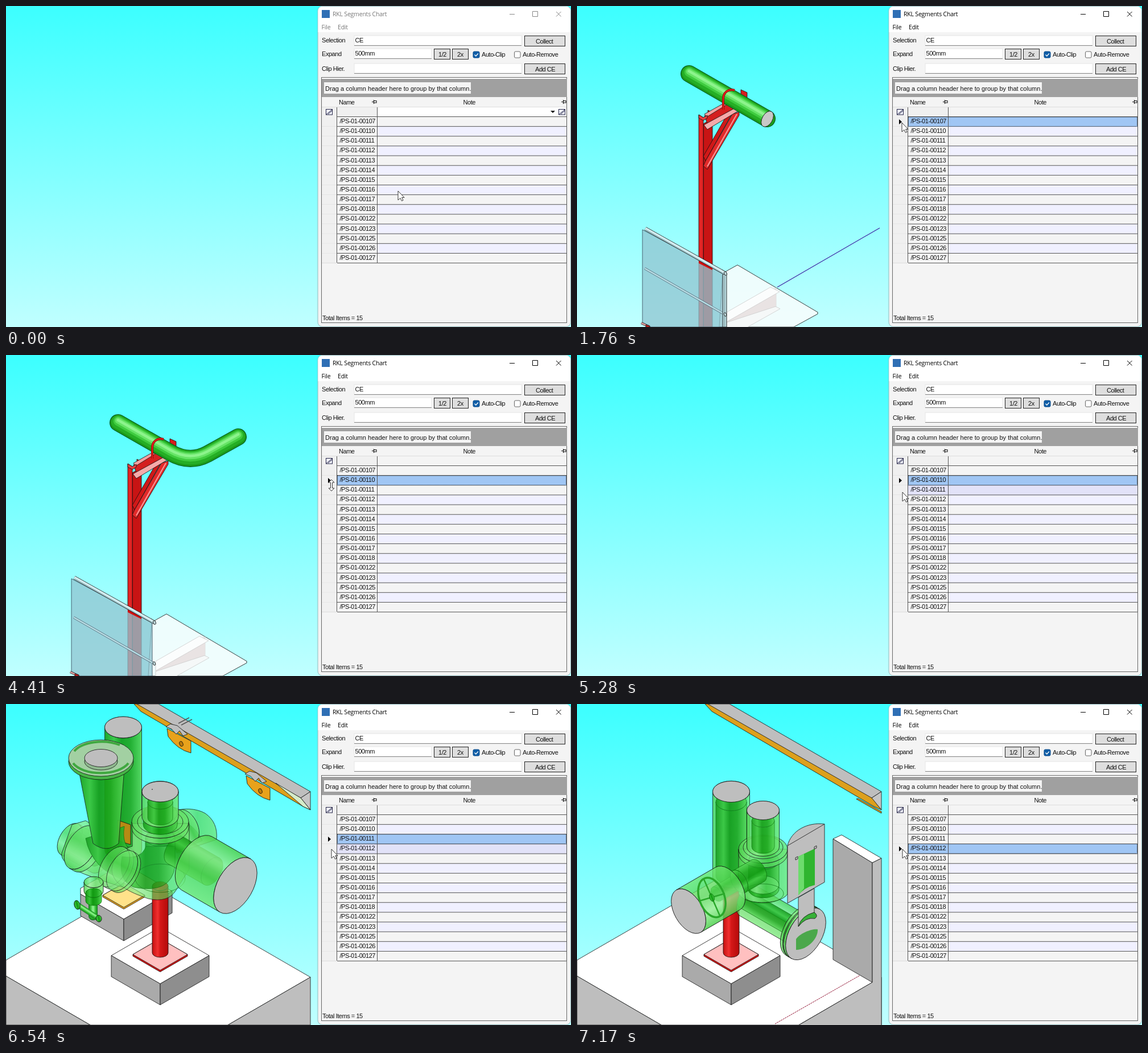
An HTML page that plays this animation: 993x564 px, repeating every 8000 ms.

```html
<!DOCTYPE html>
<html lang="en">
<head>
<meta charset="utf-8">
<title>Segments chart</title>
<style>
html, body { margin: 0; width: 100%; height: 100%; overflow: hidden; background: #7fffff; }
svg { display: block; width: 993px; height: 564px; }
text { font: 11px "Liberation Sans", Arial, sans-serif; letter-spacing: -.45px; fill: #111; white-space: pre; }
text.wide { letter-spacing: .03px; }
text.ui { font: 10.5px "Open Sans", "Noto Sans", sans-serif; letter-spacing: -.2px; fill: inherit; }
.anim { animation: 8s step-end infinite; }

#chrome { animation-name: focus; }
@keyframes focus { 0% { fill: #777; stroke: #888; } 15.875%, 100% { fill: #000; stroke: #000; } }

#filter { animation-name: filter; }
@keyframes filter { 0% { visibility: visible; } 22%, 100% { visibility: hidden; } }

#arrow { animation-name: arrow; }
@keyframes arrow {
  0% { transform: translate(689px, 325px); }
  1.625% { transform: translate(683px, 316px); }
  3.25% { transform: translate(657px, 284px); }
  4.75% { transform: translate(620px, 243px); }
  6.375% { transform: translate(592px, 218px); }
  7.875% { transform: translate(576px, 208px); }
  9.375% { transform: translate(571px, 205px); }
  34.5% { transform: translate(571px, 215px); }
  36.25% { transform: translate(571px, 221px); }
  55.125% { transform: translate(-50px, 0); }
  56.75% { transform: translate(572px, 234px); }
  58.25% { transform: translate(572px, 241px); }
  78.625% { transform: translate(-50px, 0); }
  80.125% { transform: translate(572px, 251px); }
  81.75%, 100% { transform: translate(572px, 255px); }
}
#resize { animation-name: resize; }
@keyframes resize {
  0% { transform: translate(-50px, 0); }
  55.125% { transform: translate(572px, 229px); }
  56.75% { transform: translate(-50px, 0); }
  78.625% { transform: translate(572px, 246px); }
  80.125%, 100% { transform: translate(-50px, 0); }
}
#selected { animation-name: selected; }
@keyframes selected {
  0% { transform: translateY(-900px); }
  22% { transform: translateY(0); }
  45.625% { transform: translateY(17px); }
  67.625% { transform: translateY(34px); }
  89.625%, 100% { transform: translateY(51px); }
}
#hover { animation-name: hover; }
@keyframes hover {
  0% { transform: translateY(-900px); }
  34.5% { transform: translateY(17px); }
  45.625% { transform: translateY(-900px); }
  56.75% { transform: translateY(34px); }
  67.625% { transform: translateY(-900px); }
  80.125% { transform: translateY(51px); }
  89.625%, 100% { transform: translateY(-900px); }
}
#rack { animation-name: rack; }
@keyframes rack { 0% { visibility: hidden; } 20.375% { visibility: visible; } 42.625%, 100% { visibility: hidden; } }
#bend { animation-name: bend; }
@keyframes bend { 0% { visibility: hidden; } 42.625% { visibility: visible; } 64.5%, 100% { visibility: hidden; } }
#pump { animation-name: pump; }
@keyframes pump { 0% { visibility: hidden; } 67.625% { visibility: visible; } 88%, 100% { visibility: hidden; } }
#valve { animation-name: valve; }
@keyframes valve { 0% { visibility: hidden; } 89.625%, 100% { visibility: visible; } }
</style>
</head>
<body>
<svg viewBox="0 0 993 564" xmlns="http://www.w3.org/2000/svg">
  <defs>
    <linearGradient id="sky" x2="0" y2="1"><stop stop-color="#3cffff"/><stop offset="1" stop-color="#c0ffff"/></linearGradient>
    <linearGradient id="dark"><stop stop-color="#179a17"/><stop offset=".25" stop-color="#38c438"/><stop offset=".45" stop-color="#129a12"/><stop offset=".7" stop-color="#1fa81f"/><stop offset="1" stop-color="#55d655"/></linearGradient>
    <linearGradient id="light"><stop stop-color="#4cd04c" stop-opacity=".85"/><stop offset=".3" stop-color="#8eee8e" stop-opacity=".8"/><stop offset=".6" stop-color="#50d450" stop-opacity=".75"/><stop offset="1" stop-color="#70e670" stop-opacity=".8"/></linearGradient>
    <linearGradient id="red"><stop stop-color="#c41010"/><stop offset=".35" stop-color="#f03030"/><stop offset=".5" stop-color="#d41818"/><stop offset="1" stop-color="#b40a0a"/></linearGradient>
  </defs>
  <rect width="993" height="564" fill="url(#sky)"/>
  <g id="rack" class="anim"></g>
  <g id="bend" class="anim"></g>
  <g id="pump" class="anim"></g>
  <g id="valve" class="anim"></g>
  <g id="window"></g>
  <path id="arrow" class="anim" d="M0 0V16L4 12.5 6.5 17.5 9 16.3 6.7 11.5H11Z" fill="#fff" stroke="#222" stroke-width=".9"/>
  <path id="resize" class="anim" d="M0-10L5-5H1.5V5H5L0 10-5 5H-1.5V-5H-5Z" fill="#fff" stroke="#222" stroke-width=".9"/>
</svg>
<script>
const $ = id => document.getElementById(id);
const GRAY = '#bebebe', LEFT = '#aaa', RIGHT = '#8e8e8e';
const DARK = 'url(#dark)', LIGHT = 'url(#light)', RED = 'url(#red)', MOSS = '#0c740c';

const path = (d, fill, stroke = '#111', w = .8) =>
  `<path d="${d}" fill="${fill}" stroke="${stroke}" stroke-width="${w}" stroke-linejoin="round"/>`;
const poly = (pts, fill, stroke, w) => path(`M${pts}Z`, fill, stroke, w);
const line = (d, stroke = '#111', w = .8) => path(d, 'none', stroke, w);
const ell = (x, y, rx, ry, fill, turn = 0, stroke = '#111', w = .8) =>
  `<ellipse cx="${x}" cy="${y}" rx="${rx}" ry="${ry}" fill="${fill}" stroke="${stroke}" stroke-width="${w}" transform="rotate(${turn} ${x} ${y})"/>`;
const fade = (art, a) => `<g opacity="${a}">${art}</g>`;

// Isometric cylinder: capped at x,y, its body running along local +y.
const cyl = (x, y, turn, r, len, fill = LIGHT, cap = fill) => {
  const k = r * .577, edge = cap === DARK ? MOSS : '#111';
  return `<g transform="translate(${x} ${y}) rotate(${turn})">` +
    path(`M${-r} 0V${len}A${r} ${k} 0 0 0 ${r} ${len}V0A${r} ${k} 0 0 1 ${-r} 0Z`, fill, edge) +
    ell(0, 0, r, k, cap, 0, edge) + '</g>';
};

// Shaded pipe made of stacked strokes: width, colour, vertical shift.
const tube = (d, w, cap = 'round') => [
  [1, '#052', 0], [.94, '#1a981a', 0], [.8, '#25ae25', -.04], [.55, '#3fcb3f', -.1],
  [.36, '#66e466', -.13], [.16, '#8cf48c', -.15]
].map(([k, c, dy]) =>
  `<path d="${d}" transform="translate(0 ${dy * w})" fill="none" stroke="${c}" stroke-width="${k * w}" stroke-linecap="${cap}" stroke-linejoin="round"/>`).join('');

// Steel post with bracket, and the glazed platform below it
const bracket =
  poly('288 147 299 152 299 166 288 160', '#d81c1c') +
  poly('230 183 236 186 236 200 230 198', '#d81c1c') +
  poly('222 207 238 198 238 564 222 564', '#c81414') +
  poly('214 191 222 196 222 564 214 564', '#e32424') +
  poly('224 193 262 171 278 178 278 183 230 209', '#d42020') +
  poly('224 190 258 171 262 174 228 195', '#f7a0a0') +
  poly('222 264 262 194 272 190 226 272', '#d01818') +
  poly('226 272 273 190 285 186 285 192 229 287 222 281', '#e22a2a') +
  line('M229 282L281 190', '#f79a9a', 2) +
  poly('223 209 280 178 284 184 229 217', '#f6aaaa') +
  poly('214 191 222 196 229 192 229 197 222 201 214 197', '#e84040');
const bolt = line('M257 182V163C257 152 266 145 277 148', '#700', 4) +
  line('M257 182V163C257 152 266 145 277 148', '#e51c1c', 2.6);
const platform = post =>
  poly('264 465 282 455 423 538 423 541 381 564 250 564 256 470', 'rgba(247,253,253,.88)') +
  poly('263 539 350 495 350 530 284 564 263 564', '#e9e3e3', '#ddd') +
  poly('263 538 340 494 356 502 263 555', '#fbfdfd', '#ccc') +
  poly('263 556 349 528 357 532 300 564 263 564', '#f5f8f8', '#ccc') +
  poly('115 393 257 469 257 564 130 564 115 556', 'rgba(145,198,210,.76)', '#345') +
  poly('214 446 238 460 238 464 214 452', '#d01010', 'none') +
  line('M119 461L260 542', '#456', 4) + line('M119 461L260 542', '#b5dbe2', 2.8) +
  post +
  line('M120 391L261 470', '#111', 6.5) + line('M120 391L261 470', '#d5eef1', 5) +
  line('M121 393L261 472', '#91b9c0', 1.3) +
  ell(261, 470, 2.2, 3.6, '#c3dde1', -20) + ell(260.5, 542, 2, 3.4, '#c3dde1', -20) +
  line('M113 557L126 563', '#111', 4) + line('M113 557L126 563', '#e0a0a0', 2.5) +
  poly('121 560 128 562 128 564 121 564', '#d02020');
const post = poly('256 472 263 469 263 564 256 564', '#b4d4da') + line('M259 474V564', '#688');

$('rack').innerHTML = bracket + tube('M197 119L334 198', 30) +
  ell(334.5, 198.5, 9, 15, '#c8c8c8', 30) + bolt +
  line('M352 494L532 390', '#3a1fa0', 1.1) + platform(post);
$('bend').innerHTML = bracket +
  tube('M197 119L288 171Q322 191 354 174L408 144', 30) + bolt + platform('');

// Ground, plinths and the overhead beam
const floor =
  poly('0 450 241.5 310.6 535 480 390 564 148 564 0 478', '#fff') +
  poly('0 478 148 564 0 564', GRAY) + poly('535 480 390 564 535 564', GRAY);
// The left corner may be cut short by the clip volume.
const box = (x, y, w, h, left = w) => {
  const d = w * .577, c = (w - left) * .577;
  return poly([x - left, y + c, x - left, y - c, x, y - d, x + w, y, x, y + d], '#fff') +
    poly([x - left, y + c, x, y + d, x, y + d + h, x - left, y + c + h], LEFT) +
    poly([x + w, y, x, y + d, x, y + d + h, x + w, y + h], RIGHT);
};
const plate = (x, y, w, face, edge) => {
  const d = w * .577;
  return poly([x - w, y, x, y - d, x + w, y, x + w, y + 3, x, y + d + 3, x - w, y + 3], edge) +
    poly([x - w, y, x, y - d, x + w, y, x, y + d], face);
};
const stand = box(271, 442, 86, 37) + plate(271, 440, 48, '#ffc0c0', '#d81010') +
  cyl(271, 320, 0, 14, 117, RED);
const beam =
  poly('225 0 232 0 518 164 535 186 522 180 237 13', '#dda01c') +
  poly('230 0 268 0 535 154 518 165', GRAY) +
  poly('535 154 535 186 518 165', '#c6c6c6');
const clamp = (x, y) => `<g transform="translate(${x} ${y})">` +
  path('M2 4L44 26V47Q20 41 4 18Z', '#e8a21c') +
  path('M0 1L8-4 20-1 38 14 30 17 24 8 18 14 10 5Z', GRAY) +
  ell(27, 31, 3, 4.5, '#c07c08', -20) + '</g>';

$('pump').innerHTML = floor + beam +
  poly('474 139 518 165 535 186 522 180', '#d5ecca') +
  line('M303 34L322 24M308 37L327 27', '#555', 1.5) +
  clamp(281, 39) + clamp(420, 122) +
  box(207, 329, 85, 38, 76) + plate(207, 336, 37, '#ffe28a', '#e0a020') +
  fade(cyl(206, 41, 0, 32.5, 215, DARK, GRAY), .9) + ell(206, 41, 32.5, 18.7, GRAY) +
  poly('196 204 219 212 219 247 196 240', '#b78a14') +
  fade(path('M285 190Q325 178 350 192Q373 208 370 238L300 262Z', LIGHT) +
    path('M290 205Q325 200 345 240L300 260Z', DARK, MOSS) + ell(318, 214, 18, 31, LIGHT, -28), .9) +
  fade(
    cyl(112, 238, -60, 31, 62) + cyl(118, 242, -60, 20, 50, DARK) +
    path('M116 212L140 205 225 258 205 322Q150 305 122 292 95 275 98 262Z', LIGHT) +
    cyl(132, 252, -60, 42, 10) +
    path('M140 236Q150 290 212 312L226 262Q202 250 208 215Z', DARK, MOSS) +
    path('M127 112L153 245Q176 263 198 245L208 112Z', DARK), .92) +
  ell(167, 101, 57, 32, '#46b446') + ell(167, 95, 57, 32, '#a2d0a2') +
  line('M118 104A52 27 0 0 0 215 104', '#3fa83f', 4) +
  line('M120 83A52 27 0 0 1 200 72', '#3fa83f', 4) +
  ell(167, 101, 29, 15, '#8fb98f') + ell(167, 95, 29, 15.5, GRAY) +
  stand +
  fade(
    path('M222 210V250Q190 258 186 290C186 316 215 330 250 342Q285 350 299 327L322 290V210Z', LIGHT) +
    cyl(271, 235, 0, 26, 48, DARK) +
    path('M204 268Q238 274 246 250H297V285Q290 335 225 322 196 312 204 268Z', DARK, MOSS) +
    ell(271, 306, 44, 25, 'none', 0, MOSS), .88) +
  fade(cyl(190, 286, -60, 39, 8) + cyl(204, 293, -60, 39, 6), .8) +
  fade(cyl(362, 294, 120, 27, 75, DARK), .8) +
  cyl(403, 319, 120, 54, 78, LIGHT, GRAY) +
  fade(cyl(271, 207, 0, 50, 10) + ell(271, 207, 40, 22, 'none') + cyl(271, 192, 0, 30, 20, DARK), .9) +
  cyl(271, 154, 0, 32, 44, LIGHT, GRAY) +
  fade(cyl(271, 172, 0, 22, 28, DARK), .85) + ell(271, 154, 32, 18, GRAY) +
  '<circle cx="257" cy="150" r=".8"/>' +
  fade(tube('M153 345V372', 16) + tube('M126 353L163 377', 9), .95) +
  cyl(154, 313, 0, 17, 16) + cyl(154, 332, 0, 14, 14, DARK) +
  ell(125, 353, 5, 8, DARK, -15) + ell(163, 377, 5, 6, DARK, -15);

$('valve').innerHTML = floor + beam +
  poly('491 167 494 166 535 189 535 192', '#e0a020') +
  poly('450 237 465 230 535 271 519 279', '#fff') +
  poly('450 237 519 279 519 489 450 449', LEFT) +
  poly('519 279 535 271 535 564 390 564 519 489', GRAY, 'none') +
  line('M519 279L535 271V564M519 279V489L390 564') +
  '<path d="M348 562L497 477" stroke="#901030" stroke-dasharray="3 1"/>' +
  stand +
  fade(cyl(271, 154, 0, 32.5, 150, LIGHT, GRAY) + cyl(271, 172, 0, 27, 130, DARK), .92) +
  ell(271, 154, 32.5, 18.5, GRAY) +
  fade(cyl(384, 394, 120, 30, 95) + cyl(376, 390, 120, 17, 95, DARK), .9) +
  fade(
    path('M284 255V332C290 354 357 354 370 334V255Z', LIGHT) +
    cyl(328, 275, 0, 27, 50, DARK) + ell(327, 318, 28, 16, LIGHT, 0, MOSS) + ell(327, 333, 36, 17, 'none', 0, MOSS) +
    cyl(327, 255, 0, 43, 8) + ell(327, 252, 35, 20, 'none'), .92) +
  cyl(327, 187, 0, 28.5, 64, LIGHT, GRAY) + fade(cyl(327, 205, 0, 20, 46, DARK), .85) +
  ell(327, 187, 28.5, 16.5, GRAY) +
  fade(cyl(245, 334, -120, 14, 80, DARK) + cyl(285, 312, -120, 22, 38, DARK), .85) +
  cyl(196, 364, -120, 43, 80, LIGHT, GRAY) +
  ell(237, 340, 22, 36, 'none', -20, '#2aa82a', 3.5) +
  line('M223 308L251 372M215 346L260 333', '#2aa82a', 2.5) + ell(237, 340, 4, 7, DARK, -20, MOSS) +
  path('M370 249C376 223 405 207 435 211V313L370 350Z', GRAY) +
  line('M370 249L435 211') +
  poly('389 268 418 254 418 318Q400 322 389 336', '#2fb52f', 'none') +
  poly('389 268 399 263 399 324 389 336', '#6cdc6c', 'none') +
  poly('384 270 388 268 388 272 384 274', GRAY) + poly('417 251 421 249 421 253 417 255', GRAY) +
  cyl(397, 401, 120, 50, 5) + cyl(402, 404, 120, 50, 4, LIGHT, GRAY) +
  path('M385 413C392 402 415 394 423 396C424 412 405 432 385 432Z', '#4ba84b', 'none') +
  path('M389 340L417 324V372Q400 374 389 391Z', GRAY) +
  path('M389 391Q394 372 417 366Q425 372 418 377Q402 374 389 391Z', '#38b038');

// Application window
const rect = (x, y, w, h, fill, stroke = 'none', r = 0) =>
  `<rect x="${x}" y="${y}" width="${w}" height="${h}" fill="${fill}" stroke="${stroke}" rx="${r}"/>`;
const text = (x, y, s, cls = '') => `<text x="${x}" y="${y}" class="${cls}">${s}</text>`;
const button = (x, y, w, h, s, tx) => rect(x + .5, y + .5, w, h, '#dedede', '#222') + text(tx, y + 13.5, s);
const field = (x, y, w, s = '') => rect(x, y, w, 17, '#fff', '#e6e6e6') +
  line(`M${x} ${y + 17.5}h${w}`, '#888', 1) + text(x + 1.5, y + 12, s);
const pin = x => line(`M${x - 4} 168.5h3M${x - .5} 165v7M${x} 166.5h4v3.5h-4M${x} 170h4`, '#111', 1.1);
const funnel = x => rect(x - 5.5, 181.5, 11, 9.5, '#f4f6ff', '#224') +
  line(`M${x - 5} 190.5L${x + 5} 182M${x - 2} 190L${x + 5} 184`, '#224', 1);

const codes = [107, 110, 111, 112, 113, 114, 115, 116, 117, 118, 122, 123, 125, 126, 127];
const PITCH = 17.14, rowY = i => 194.5 + i * PITCH;
const cells = codes.map((_, i) => {
  const y = rowY(i);
  return rect(555, y, 26, PITCH, '#f0f0f0') + line(`M555 ${y + PITCH}h26`, '#dcdcdc', 1) +
    rect(582, y, 70, PITCH, '#f4f4f4') + rect(653, y, 332, PITCH, i % 2 ? '#f0f0ff' : '#f4f4f4');
}).join('');
const rules = codes.map((_, i) => line(`M582 ${rowY(i + 1)}H985`, '#555', 1)).join('');
const names = codes.map((n, i) => text(586.5, rowY(i) + 11.5, '/PS-01-00' + n)).join('');

$('window').innerHTML =
  rect(548, .5, 444.5, 563, '#f4f4f4', '#8fb9bd', 8) +
  path('M548.5 46V9Q548.5 1 556.5 1H984Q992 1 992 9V46Z', '#fff', 'none') +
  rect(555, 7, 14, 14, '#2f6fb5') +
  '<g id="chrome" class="anim">' +
    `<g stroke="none">${text(574, 18, 'RKL Segments Chart', 'ui')}${text(554.5, 41, 'File', 'ui')}${text(583, 41, 'Edit', 'ui')}</g>` +
    '<path d="M885 14.5h9M925.5 9.5h9v9h-9zM967 10l8.5 8.5M975.5 10L967 18.5" fill="none"/></g>' +
  text(555, 64, 'Selection') + text(555, 88, 'Expand') + text(555, 114, 'Clip Hier.') +
  field(612, 52, 294, 'CE') + field(612, 75, 136, '500mm') + field(612, 101, 294) +
  button(911, 52, 71, 18, 'Collect', 931) + button(911, 101, 71, 18, 'Add CE', 930) +
  button(752, 75, 28, 18, '1/2', 760) + button(784, 75, 28, 18, '2x', 793) +
  rect(821, 80, 11, 11, '#0f5ea8', '#0a4c8c', 2) + line('M823.5 85.5l2.3 2.5 4-4.5', '#fff', 1.2) +
  text(836, 88.5, 'Auto-Clip') + rect(893.5, 80, 10.5, 11, '#fff', '#666', 2) + text(908, 88.5, 'Auto-Remove') +
  rect(554.5, 125.5, 431, 431, '#f4f4f4', '#666') + rect(555, 126, 430, 2, '#fff') +
  rect(555, 128, 431, 32, '#a0a0a0') + rect(559, 134, 258, 20, '#f4f4f4') +
  text(561, 149, 'Drag a column header here to group by that column.', 'wide') +
  rect(555, 160, 430, 34, '#f4f4f4') + rect(555, 178, 97, 16, '#f0f0f0') +
  text(585, 172.5, 'Name') + text(803.5, 172.5, 'Note') + pin(647) + pin(980) +
  line('M555 177.5H985', '#ddd', 1) + funnel(568) +
  `<g id="filter" class="anim">${rect(653, 178, 332, 16, '#fff') + poly('957 184 965 184 961 188', '#111', 'none') + funnel(977)}</g>` +
  cells +
  `<g id="hover" class="anim">${rect(582, 195, 403, 17, '#e2e2f8')}</g>` +
  rules + line('M582 194.5H985M581.5 178V451M652.5 178V451M985.5 178V451', '#555', 1) +
  '<g id="selected" class="anim">' + rect(582, 195, 403, 17, '#a0c6f4') +
    '<rect x="582.5" y="195" width="402" height="16.5" fill="none" stroke="#111" stroke-dasharray="1 1"/>' +
    line('M652.5 195v16', '#555', 1) + poly('566 199 571 203.5 566 208', '#000', 'none') + '</g>' +
  names + text(556, 552, 'Total Items = 15');
</script>
</body>
</html>
```
